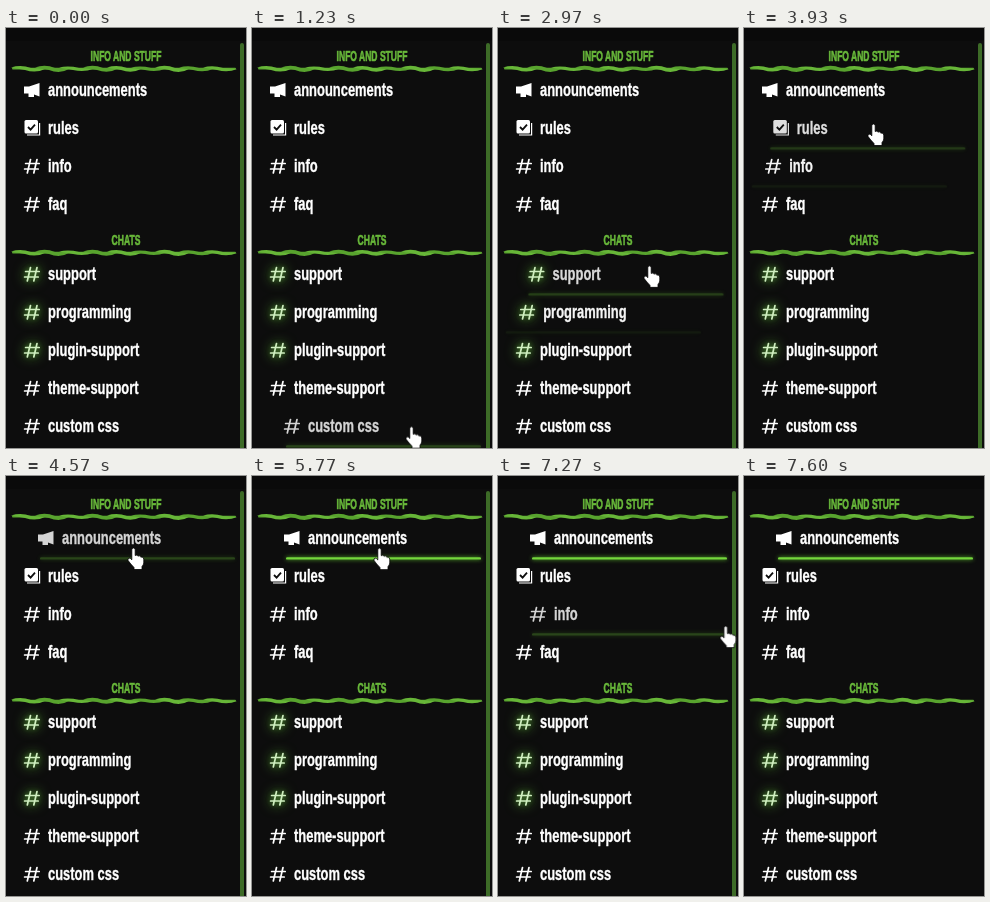
Recreate the animation shown at these times as an HTML page. Size 240x420 px, loop 7.91 s.

```html
<!DOCTYPE html>
<html lang="en">
<head>
<meta charset="utf-8">
<title>Channel list</title>
<style>
  html, body { margin: 0; width: 100%; height: 100%; overflow: hidden; background: #0d0d0d; }
  svg { display: block; width: 240px; height: 420px; }
  text { font-family: "Liberation Sans", Arial, sans-serif; font-weight: 700; }
  .name { font-size: 18.5px; fill: currentColor; stroke: currentColor; stroke-width: .4; transform: scaleX(.7); }
  .title { font-size: 15px; fill: #68b83a; stroke: #68b83a; stroke-width: .7; text-anchor: middle; transform: scaleX(.57); }
  .line { fill: #74d63c; opacity: 0; filter: drop-shadow(0 0 2px #5fc42c); }
  .glow { color: #d0efc0; filter: drop-shadow(0 0 2px #5a9a3a90) drop-shadow(0 0 6px #4c9a2a); }
  .hash { fill: none; stroke: currentColor; stroke-width: 1.7; stroke-linecap: round; }
</style>
</head>
<body>
<svg id="stage" viewBox="0 0 240 420"></svg>
<script>
const LOOP = 7910, FADE = 300, ROW_HEIGHT = 38;
const SELECT = { start: 5070, end: 5300 };
const stage = document.getElementById('stage');

const sections = [
  { title: 'INFO AND STUFF', y: 32, names: ['announcements', 'rules', 'info', 'faq'] },
  { title: 'CHATS', y: 216, names: ['support', 'programming', 'plugin-support', 'theme-support', 'custom css'] },
];
const iconOf = { announcements: 'horn', rules: 'book' };
const unread = ['support', 'programming', 'plugin-support'];

// Stops of the fingertip: time, x, y
const stops = [
  [700, 156, 422], [800, 160, 400], [1230, 160, 400], [1350, 160, 362],
  [1770, 160, 362], [1930, 156, 320], [2400, 156, 320], [2790, 153, 271],
  [2970, 152, 239], [3930, 130, 97], [4450, 128, 73], [5770, 128, 73],
  [6490, 122, 119], [6630, 120, 148], [7070, 120, 148], [7330, 260, 152],
];

function pointerAt(time) {
  const next = stops.findIndex(stop => stop[0] > time);
  if (next < 1) return { x: 260, y: 440 };
  const [t0, x0, y0] = stops[next - 1], [t1, x1, y1] = stops[next];
  const k = (time - t0) / (t1 - t0);
  return { x: x0 + (x1 - x0) * k, y: y0 + (y1 - y0) * k };
}

// Spans of time in which the pointer is over the row centred at y
function findVisits(rowY) {
  const visits = [];
  let enter = null;
  for (let time = 0; time <= LOOP; time += 10) {
    const { x, y } = pointerAt(time);
    const inside = x < 232 && Math.abs(y - rowY) < ROW_HEIGHT / 2;
    if (inside && enter === null) enter = time;
    if (!inside && enter !== null) {
      visits.push([enter, time]);
      enter = null;
    }
  }
  return visits;
}

function add(parent, tag, attrs = {}, text = '') {
  const el = document.createElementNS('http://www.w3.org/2000/svg', tag);
  for (const key in attrs) el.setAttribute(key, attrs[key]);
  el.textContent = text;
  return parent.appendChild(el);
}

// steps: [time, properties, easing]; the first and last poses are held
function play(el, steps) {
  const all = [[0, steps[0][1]], ...steps, [LOOP, steps[steps.length - 1][1]]];
  const frames = all.map(([time, props, easing = 'linear']) =>
    ({ offset: time / LOOP, easing, ...props }));
  el.animate(frames, { duration: LOOP, iterations: Infinity });
}

const moveTo = (x, y = 0) => ({ transform: `translate(${x}px, ${y}px)` });

function addDivider(y) {
  add(stage, 'rect', { x: 6, y: y - 0.8, width: 224, height: 1.8, rx: 0.9, fill: '#58a32e' });
  for (let i = 0; i < 9; i++) {
    const x = 5 + i * 24, lift = 3 + Math.sin(i * 2.3);
    add(stage, 'path', {
      fill: i % 2 ? '#58a32e' : '#67b638',
      d: `M${x} ${y - 1}Q${x + 10} ${y - lift - 1} ${x + 20} ${y - 0.5}L${x + 34} ${y + 0.5}` +
         `Q${x + 25} ${y + lift + 2} ${x + 14} ${y + 1.5}Z`,
    });
  }
}

const icons = {
  hash(g) {
    add(g, 'path', { class: 'hash', d: 'M24.5-6.5L21.3 7M31-6.5L27.8 7M19.6-2.5H33.2M18.6 3H32.2' });
  },
  horn(g) {
    add(g, 'path', { fill: 'currentColor', d: 'M18-3.5H23L33.5-7V6.5L28 4.6V7H22.5V3.5H18Z' });
  },
  book(g) {
    add(g, 'rect', { x: 18.5, y: -8, width: 13.5, height: 13.5, rx: 1.5, fill: 'currentColor' });
    add(g, 'path', { d: 'M33.6-5V7H21', fill: 'none', stroke: 'currentColor', 'stroke-width': 1.2 });
    add(g, 'path', { d: 'M22-1L24.6 1.6L29-3.4', fill: 'none', stroke: '#0d0d0d', 'stroke-width': 1.8 });
  },
};

function addRow(name, y) {
  const g = add(stage, 'g', { transform: `translate(0 ${y})` });
  const line = add(g, 'rect', { class: 'line', y: 19.2, width: 195, height: 2.4, rx: 1.2 });
  const body = add(g, 'g');
  icons[iconOf[name] || 'hash'](add(body, 'g', unread.includes(name) ? { class: 'glow' } : {}));
  add(add(body, 'g', { transform: 'translate(42 6)' }), 'text', { class: 'name' }, name);
  return { line, body };
}

function animateRow({ line, body }, visits, selectable) {
  const rest = { ...moveTo(0), color: '#fff' };
  const hover = { ...moveTo(14), color: '#d4d4d4' };
  const hidden = { ...moveTo(0), opacity: 0 };
  const dim = { ...moveTo(34), opacity: 0.28 };

  const transition = (off, on, selected) => {
    const steps = [[0, off]];
    for (const [enter, leave] of visits) {
      steps.push([enter, off, 'ease'], [Math.min(enter + FADE, leave), on]);
      if (selectable) steps.push([SELECT.start, on, 'ease'], [SELECT.end, selected]);
      else steps.push([leave, on, 'ease'], [leave + FADE, off]);
    }
    return steps;
  };
  play(body, transition(rest, hover, { ...hover, color: '#fff' }));
  play(line, transition(hidden, dim, { ...dim, opacity: 1 }));
}

add(stage, 'rect', { width: 240, height: 13, fill: '#0a0a0a' });

for (const { title, y, names } of sections) {
  add(add(stage, 'g', { transform: `translate(120 ${y + 0.5})` }), 'text', { class: 'title' }, title);
  addDivider(y + 8.5);
  names.forEach((name, i) => {
    const rowY = y + 30 + i * ROW_HEIGHT;
    animateRow(addRow(name, rowY), findVisits(rowY), name === 'announcements');
  });
}

const scrollbar = add(stage, 'rect', { x: 234, y: 15, width: 4, height: 420, rx: 2, fill: '#3d6b27' });
play(scrollbar, [[7300, { opacity: 1 }], [7400, { opacity: 0 }]]);

const hand = add(stage, 'g');
add(hand, 'path', {
  transform: 'translate(-6.5 -1.5)',
  fill: '#fff', stroke: '#000', 'stroke-width': 0.8,
  d: 'M4.3 1.5Q6-.6 7.7 1.5V8Q9.5 7 10.6 8.6Q12.4 7.8 13.4 9.6Q15.8 9 16.3 11.5V15.5' +
     'Q16 17.5 14.5 19V22H6.5V20Q3 16.5 .6 13Q-.2 11 1.6 10.6Q3 10.6 4.3 12.3Z',
});
play(hand, stops.map(([time, x, y]) => [time, moveTo(x, y)]));
</script>
</body>
</html>
```
